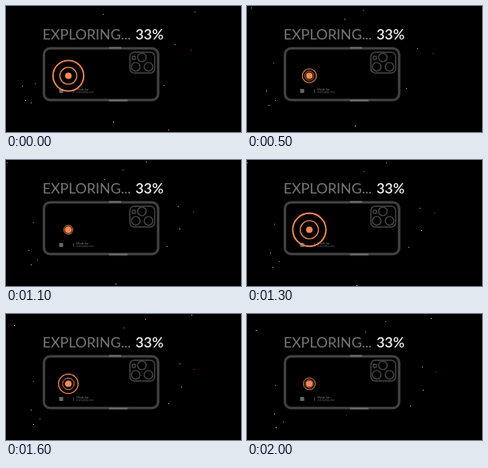
Write an HTML page that moves like this. It is 294 px wide and 158 px high and loops after 2.1 s.

```html
<!DOCTYPE html>
<html lang="en">
<head>
<meta charset="utf-8">
<title>Exploring</title>
<style>
  html, body { margin: 0; width: 100%; height: 100%; overflow: hidden; background: #000; }
  svg { display: block; width: 294px; height: 158px; }
  text { font-family: Lato, "Open Sans", sans-serif; }
  .title { font-size: 17.8px; font-weight: 400; fill: #777; }
  .count { font-size: 17.8px; font-weight: 600; fill: #f4f4f4; }
  .tiny { font-size: 3.8px; fill: #666; }
  .phone { fill: none; stroke: #484848; stroke-width: 1.4; }
  .ring { fill: none; stroke: #f58a50; }
</style>
</head>
<body>
<svg viewBox="0 0 294 158">
  <rect width="294" height="158"/>
  <text class="title" x="45.7" y="42">EXPLORING...</text>
  <text class="count" x="162" y="42">33%</text>

  <g class="phone">
    <rect x="47.2" y="52.8" width="143.4" height="65.4" rx="8" stroke-width="2.6" stroke="#414141"/>
    <rect x="48.6" y="54.2" width="140.6" height="62.6" rx="6.8" stroke-width=".6" stroke="#606060"/>
    <path d="M129 52.5h15M129 118.5h23" stroke="#707070" stroke-width="2"/>
    <rect x="155" y="58" width="31" height="26" rx="5.5"/>
    <circle cx="170" cy="64.5" r="5.4"/>
    <circle cx="162.3" cy="76.3" r="5.4"/>
    <circle cx="178.3" cy="76.3" r="5.4"/>
    <rect x="158" y="63" width="4" height="4" rx="1"/>
  </g>
  <rect x="66.5" y="104" width="5" height="5" fill="#666"/>
  <path d="M84.5 104v5" stroke="#555" stroke-width=".8"/>
  <text class="tiny" x="88" y="106.3" font-weight="700">Made for</text>
  <text class="tiny" x="88" y="109.4">everyday use</text>

  <g id="dots"></g>
  <circle class="ring" id="outer" cx="78" cy="87.5"/>
  <circle class="ring" id="inner" cx="78" cy="87.5"/>
  <circle cx="78" cy="87.5" r="4.1" fill="#f58a50"/>
</svg>
<script>
  const LOOP = 2100, STEP = 100, PULSE = 1340;
  const AMBER = '#e8b850', ORANGE = '#ef7a3c', RED = '#e02818', PALE = '#e6dcc0';

  // x, y, speed x, speed y (px/s), colour, visible from, visible until (s)
  const sparks = [
    [143.5, -1, 2, 11.5, ORANGE, 0, 2.1],
    [177, -7, -2, 8, AMBER, 0, 2.1],
    [211, 48, 4, 9, AMBER, 0, 2.1],
    [231, 55, 2.6, 8.6, RED, 0, 2.1],
    [134, 145, 2.5, 9.3, PALE, 0, 2.1],
    [203, 155, 2, 9, AMBER, 0, 0.3],
    [197, 98.5, 3.6, 8.3, AMBER, 0, 2.1],
    [213.5, 75.5, 3.2, 9.7, PALE, 0.6, 2.1],
    [32.5, 64.5, 1.2, 12.2, ORANGE, 0.2, 2.1],
    [20, 99.5, 7, 12.7, AMBER, 0, 2.1],
    [31.5, 112, 6.7, 11.6, ORANGE, 0.2, 2.1],
    [24, 118, 6, 12.2, PALE, 0, 2.1],
    [36, 97, 4, 12, ORANGE, 0, 0.2],
    [31, 121, 5, 12, AMBER, 0, 0.2],
    [8, 0.5, -6, 2, ORANGE, 0.5, 1.5],
    [6, -8, 2.5, 14, PALE, 1.5, 2.1],
    [121, 10, 2, 12.5, AMBER, 0, 1.2],
    [121, 112, 1.5, 7.5, RED, 1.7, 2.1],
    [236, 7, 2, 10, AMBER, 0, 0.5],
    [238, -13, -4, 9, PALE, 1.5, 2.1]
  ];

  const byId = id => document.getElementById(id);
  const dots = sparks.map(spark => {
    const dot = document.createElementNS('http://www.w3.org/2000/svg', 'rect');
    dot.setAttribute('width', 1);
    dot.setAttribute('height', 1);
    dot.setAttribute('fill', spark[4]);
    return byId('dots').appendChild(dot);
  });

  function setRing(ring, radius, width) {
    ring.setAttribute('r', radius);
    ring.setAttribute('stroke-width', width);
  }

  function draw(now) {
    const time = Math.floor(now % LOOP / STEP) * STEP;
    const s = time / 1000;
    sparks.forEach(([x, y, vx, vy, , from, until], i) => {
      dots[i].setAttribute('x', Math.round(x + vx * s));
      dots[i].setAttribute('y', Math.round(y + vy * s));
      dots[i].setAttribute('opacity', s >= from && s < until ? 1 : 0);
    });

    // Rings shrink towards the centre dot with an exponential ease-out.
    const phase = time < 1300 ? time : time - PULSE;
    const spread = Math.exp(-phase / 390);
    setRing(byId('outer'), 4.8 + 14.4 * spread, 0.8 + spread);
    setRing(byId('inner'), 3.8 + 6.8 * spread, 0.6 + 0.7 * spread);
    requestAnimationFrame(draw);
  }
  draw(0);
</script>
</body>
</html>
```
